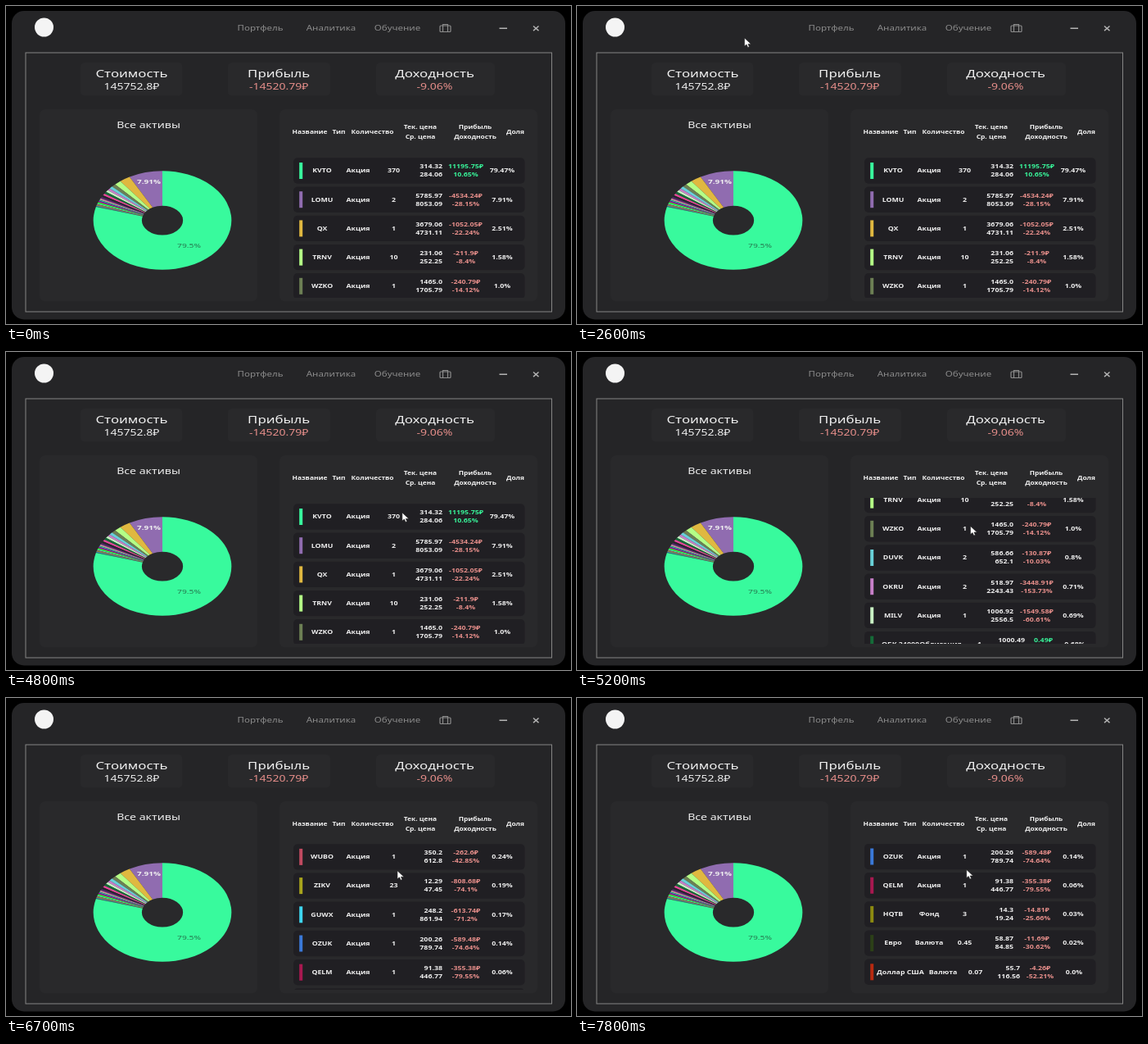
Animation of 690 by 388 pixels, one loop 8 s. Source, as an HTML page:

```html
<!DOCTYPE html>
<html lang="ru">
<head>
<meta charset="utf-8">
<title>Портфель</title>
<style>
  html, body { margin: 0; width: 100%; height: 100%; overflow: hidden; background: #000; }
  svg { display: block; width: 690px; height: 388px; }
  text { font-family: "Noto Sans", "Open Sans", sans-serif; white-space: pre; }
  .panel { fill: #29292b; }
  .row { fill: #201f23; }
  .icon { fill: none; stroke: #8c8c8c; stroke-width: 1.2; }
</style>
</head>
<body>
<svg id="stage" viewBox="0 0 690 388">
  <defs><clipPath id="view"><rect x="345" y="178" width="295" height="178"/></clipPath></defs>
  <rect x="7" y="6" width="676" height="376.5" rx="15" fill="#252527"/>
  <circle cx="46.5" cy="26" r="11.5" fill="#f4f4f4"/>
  <g class="icon">
    <rect x="530" y="24" width="13" height="7.5" rx="1"/>
    <path d="M533.500 24v-1.500h6v1.500M533.500 24v7.500M539.500 24v7.500"/>
    <path d="M602.500 27.200h9.500M644 24.500l6.500 5.600M650.500 24.500l-6.500 5.600" stroke="#b4b4b4" stroke-width="1.4"/>
  </g>
  <rect x="24" y="57" width="642.5" height="316" fill="none" stroke="#858585"/>
  <g class="panel">
    <rect x="91" y="69" width="124.5" height="40.5" rx="5"/>
    <rect x="271" y="69" width="125" height="40.5" rx="5"/>
    <rect x="452" y="69" width="145" height="40.5" rx="5"/>
    <rect x="41" y="126" width="266" height="234.5" rx="7"/>
    <rect x="334" y="126" width="315" height="234.5" rx="7"/>
  </g>
  <g id="pie" transform="translate(191 261.6) scale(-1.4 1) rotate(-90)" fill="none" stroke-width="42.3"/>
  <g id="labels"/>
  <g clip-path="url(#view)"><g id="list"/></g>
  <path id="cursor" d="M0 0V10L2.5 7.9L4.2 11.4L5.9 10.7L4.4 7.4H8Z" fill="#fff" stroke="#111" stroke-width=".5"/>
</svg>
<script>
const WHITE = '#f0f0f0', RED = '#e88f8b', GREEN = '#38f59a', GREY = '#8c8c8c';
const STRETCH = 1.32, PITCH = 35.2, TICK = 31.5, MAX_SCROLL = 711.5, LOOP = 8000;
const $ = id => document.getElementById(id);

function add(parent, tag, attrs) {
  const el = document.createElementNS('http://www.w3.org/2000/svg', tag);
  for (const key in attrs) el.setAttribute(key, attrs[key]);
  return parent.appendChild(el);
}

// The window is shown wider than it was laid out, so all text shares one stretch.
function label(parent, str, x, y, size, fill = WHITE, weight = 400, anchor = 'middle') {
  const px = size / STRETCH;
  add(parent, 'text', {
    transform: `translate(${x} ${y + px * 0.357}) scale(${STRETCH} 1)`,
    'font-size': px, 'font-weight': weight, 'text-anchor': anchor, fill
  }).textContent = str;
}

// name | type | amount | price | average | share | colour | profit? | yield?
const assets = `KVTO|Акция|370|314.32|284.06|79.47|#38fa9d|11195.75
LOMU|Акция|2|5785.97|8053.09|7.91|#906cb0
QX|Акция|1|3679.06|4731.11|2.51|#e0b840
TRNV|Акция|10|231.06|252.25|1.58|#b4ff86
WZKO|Акция|1|1465.0|1705.79|1.0|#6c7f54
DUVK|Акция|2|586.66|652.1|0.8|#68d0d8|-130.87|-10.03
OKRU|Акция|2|518.97|2243.43|0.71|#c77fc9|-3448.91|-153.73
MILV|Акция|1|1006.92|2556.5|0.69|#c9f2c4
ОБК 24000|Облигация|1|1000.49|1000.0|0.68|#156b38
DOQU|Акция|1|982.4|1104.3|0.62|#e8489a
LUKZ|Акция|3|281.6|330.15|0.58|#26262c
NULQ|Акция|2|384.44|401.04|0.55|#5a2270
HQTU|Фонд|10|71.57|94.49|0.49|#c48f9b
VKOZ|Фонд|105|6.03|6.21|0.43|#27b59b|-18.62|-2.86
DRUQ|Акция|5|119.62|129.81|0.41|#a000a8
JUNZ|Акция|1|566.92|969.69|0.39|#3cf52c
EQVO|Акция|2|249.33|447.9|0.34|#40e8a8|-397.13
WUBO|Акция|1|350.2|612.8|0.24|#c04a60
ZIKV|Акция|23|12.29|47.45|0.19|#a8a41c
GUWX|Акция|1|248.2|861.94|0.17|#3ed6f0
OZUK|Акция|1|200.26|789.74|0.14|#3a78d8
QELM|Акция|1|91.38|446.77|0.06|#a81850|-355.38
HQTB|Фонд|3|14.3|19.24|0.03|#8c8a10|-14.81|-25.66
Евро|Валюта|0.45|58.87|84.85|0.02|#2c4018
Доллар США|Валюта|0.07|55.7|116.56|0.0|#b82a10`.split('\n').map(line => line.split('|'));

// Long names push the later columns to the right.
const shifts = { 'ОБК 24000': [9, 14, 18, 14, 8, 2], 'Доллар США': [9, 17, 13, 8, 4, 1] };

function drawRow([name, type, amount, price, average, share, color, profit, gain], i) {
  const row = add($('list'), 'g', { transform: `translate(0 ${201 + i * PITCH})` });
  const dx = shifts[name] || [0, 0, 0, 0, 0, 0];
  const cell = (str, x, y, fill, anchor) => label(row, str, x, y, 8.8, fill, 600, anchor);
  profit ??= +((price - average) * amount).toFixed(2);
  gain ??= +((price / average - 1) * 100).toFixed(2);
  const tone = profit < 0 ? RED : GREEN;
  add(row, 'rect', { class: 'row', x: 351, y: -15.7, width: 282.5, height: 31.4, rx: 5 });
  add(row, 'rect', { x: 358.2, y: -10, width: 4, height: 20, fill: color });
  cell(name, 386 + dx[0], 0);
  cell(type, 430 + dx[1], 0);
  cell(amount, 473.5 + dx[2], 0);
  cell(price, 533 + dx[3], -5, WHITE, 'end');
  cell(average, 533 + dx[3], 5, WHITE, 'end');
  cell(profit + '₽', 561.5 + dx[4], -5, tone);
  cell(gain + '%', 561.5 + dx[4], 5, tone);
  cell(share + '%', 606 + dx[5], 0);
}

function drawPie() {
  let from = 0;
  for (const asset of [...assets.slice(1), assets[0]]) {
    const share = +asset[5];
    add($('pie'), 'circle', {
      r: 39.1, pathLength: 100, stroke: asset[6],
      'stroke-dasharray': `${share} ${100 - share}`, 'stroke-dashoffset': -from
    });
    from += share;
  }
}

drawPie();
assets.forEach(drawRow);

const text = (...args) => label($('labels'), ...args);
text('Портфель', 310.5, 27.2, 11.5, GREY);
text('Аналитика', 397, 27.2, 11.5, GREY);
text('Обучение', 478, 27.2, 11.5, GREY);

function card(title, value, x, tone) {
  text(title, x, 82.3, 16.8, WHITE, 500);
  text(value, x, 98.3, 14, tone, 500);
}
card('Стоимость', '145752.8₽', 153.5, WHITE);
card('Прибыль', '-14520.79₽', 333.2, RED);
card('Доходность', '-9.06%', 523.5, RED);

text('Все активы', 174, 145.5, 14.1, WHITE, 500);
text('7.91%', 174.5, 214.3, 10, WHITE, 700);
text('79.5%', 223.5, 292.5, 10.3, '#26784f');

const head = (str, x, y) => text(str, x, y, 8.4, WHITE, 600);
head('Название', 371, 154);
head('Тип', 406.5, 154);
head('Количество', 447.5, 154);
head('Тек. цена', 506, 147.7);
head('Ср. цена', 506, 160);
head('Прибыль', 573, 147.7);
head('Доходность', 573, 160);
head('Доля', 622, 154);

// time, x, y of the pointer tip
const path = [
  [1300, 159, 14], [1500, 159, 14], [2000, 165, 43], [2100, 165, 43], [2600, 204.5, 39],
  [2800, 200, 42], [3100, 156, 88], [3200, 154, 97], [3300, 154, 97], [3800, 352.5, 97.5],
  [4100, 504, 97], [4200, 504, 97], [4900, 480.5, 212.5], [5500, 480.5, 212.5],
  [5900, 478.3, 213], [6400, 478.3, 213], [6900, 477.7, 209.3], [7500, 475.7, 209.5]
];

// time, wheel ticks turned so far
const wheel = [
  [5000, 0], [5200, 4], [5400, 6], [5600, 6], [6000, 13], [6900, 21],
  [7200, 22], [7400, 22], [7600, MAX_SCROLL / TICK]
];

function at(keys, t, k = 1) {
  const next = keys.findIndex(key => key[0] > t);
  if (next < 0) return keys[keys.length - 1][k];
  if (next === 0) return keys[0][k];
  const a = keys[next - 1], b = keys[next];
  return a[k] + (b[k] - a[k]) * (t - a[0]) / (b[0] - a[0]);
}

const start = performance.now();
function draw(now) {
  // The picture moves in steps of a tenth of a second.
  const t = Math.floor(Math.max(0, now - start) % LOOP / 100) * 100;
  $('list').setAttribute('transform', `translate(0 ${-at(wheel, t) * TICK})`);
  $('cursor').setAttribute('transform', `translate(${at(path, t)} ${at(path, t, 2)})`);
  $('cursor').setAttribute('visibility', t < path[0][0] ? 'hidden' : 'visible');
  requestAnimationFrame(draw);
}
draw(start);
</script>
</body>
</html>
```
